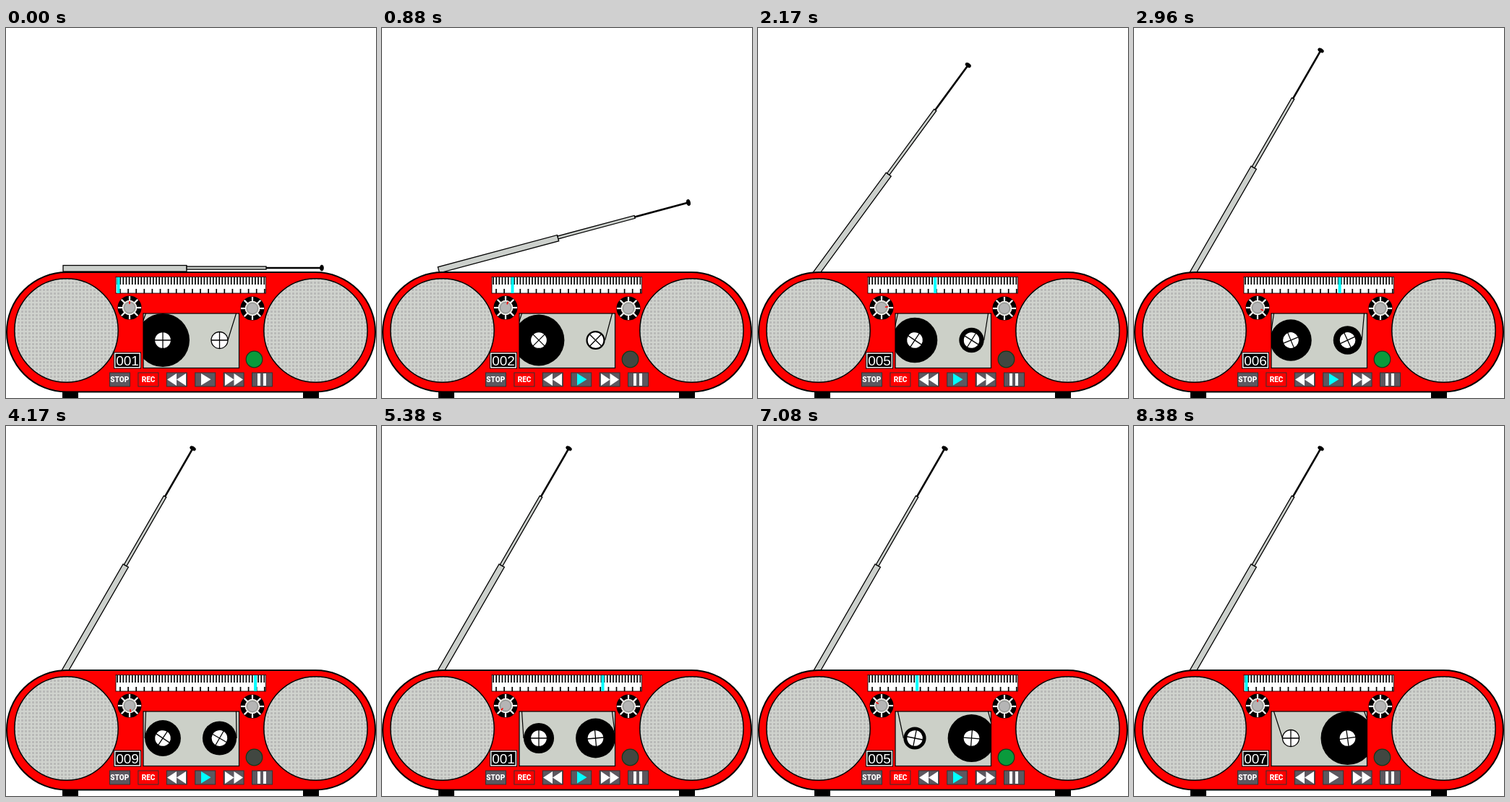
An HTML page that plays this animation: 512 px wide and 512 px high, repeating every 8430 ms.

```html
<!DOCTYPE html>
<html lang="en">
<head>
<meta charset="utf-8">
<title>Radio cassette player</title>
<style>
  html, body { margin: 0; width: 100%; height: 100%; overflow: hidden; background: #fff; }
  svg { display: block; width: 100vw; height: 100vh; }
  .label { font: 900 10px Roboto, sans-serif; fill: #fff; text-anchor: middle; }
  .digits { font: 19px "Liberation Sans", Arial, sans-serif; fill: #fff; text-anchor: middle; }
</style>
</head>
<body>
<svg viewBox="0 0 512 512">
  <defs>
    <pattern id="mesh" width="5" height="5" patternUnits="userSpaceOnUse">
      <rect width="5" height="5" fill="#d0d3ce"/>
      <rect x="1" y="1" width="3" height="3" fill="#b9bab8"/>
    </pattern>
    <clipPath id="window"><rect x="190" y="395" width="132.5" height="75.5"/></clipPath>
    <g id="hub" stroke="#000" stroke-width="1.3">
      <circle r="11.5" fill="#fff"/>
      <path d="M-11.5 0H11.5M0-11.5V11.5"/>
    </g>
    <g id="knob">
      <circle r="13.3" fill="none" stroke="#000" stroke-width="6.5"/>
      <g id="marks" stroke="#fff" stroke-width="2.2"></g>
      <circle r="9.8" fill="#ccd0c8" stroke="#fff"/>
      <circle r="7.5" fill="#b5b5b5" stroke="#777" stroke-width=".8"/>
    </g>
  </defs>

  <g id="antenna" stroke="#000">
    <rect x="79" y="328.5" width="171" height="8.5" fill="#ccd0cc" stroke-width="1.3"/>
    <rect x="250" y="330" width="110" height="4" fill="#ccd0cc" stroke-width="1.3"/>
    <path d="M360 332H436" stroke-width="2.6"/>
    <ellipse cx="437" cy="332" rx="2.3" ry="4" fill="#000"/>
  </g>

  <path d="M78 500h22v12h-22zM411 500h22v12h-22z"/>
  <rect x="1" y="338" width="510" height="165.5" rx="82.7" fill="#f00" stroke="#000" stroke-width="2"/>
  <g fill="url(#mesh)" stroke="#000" stroke-width="1.5">
    <circle cx="83.5" cy="418.5" r="71.7"/>
    <circle cx="428.5" cy="418.5" r="71.7"/>
  </g>

  <rect x="152" y="344.5" width="207.5" height="22.5" fill="#fff" stroke="#000" stroke-width=".8"/>
  <path id="scale" stroke="#000" stroke-width="1.7"/>
  <rect id="needle" y="345" width="4" height="22" fill="#0ff"/>

  <use href="#knob" x="171" y="387"/>
  <path id="pointer" d="M0-5V-9" stroke="#f00" stroke-width="1.6"/>
  <use href="#knob" x="341" y="388"/>

  <rect x="190" y="395" width="132.5" height="75.5" fill="#ccd0c8"/>
  <g clip-path="url(#window)">
    <path id="tape" fill="none" stroke="#000" stroke-width="1.2"/>
    <circle id="supply" cx="217" cy="432"/>
    <circle id="takeup" cx="295.5" cy="432"/>
    <use id="hubL" href="#hub"/>
    <use id="hubR" href="#hub"/>
  </g>
  <rect x="190" y="395" width="132.5" height="75.5" fill="none" stroke="#000" stroke-width="1.2"/>

  <rect x="149" y="448.5" width="38" height="23"/>
  <rect x="150.7" y="450.2" width="34.6" height="19.6" fill="none" stroke="#fff" stroke-width="1.4"/>
  <text id="count" class="digits" x="168" y="467"></text>
  <circle id="led" cx="343.5" cy="458.5" r="11.3" stroke="#123a1c" stroke-width="1.2"/>

  <g id="buttons" stroke="#333" stroke-width="1"></g>
  <text class="label" x="157.3" y="490">STOP</text>
  <text class="label" x="197" y="490">REC</text>
  <path fill="#fff" d="M236 478v17l-13-8.500zM249 478v17l-13-8.500zM303 478v17l12.500-8.500zM315.500 478v17l12.500-8.500zM348 478h4v17h-4zM356 478h4v17h-4z"/>
  <path id="play" d="M270 478v16.500l13.500-8.300z"/>
</svg>
<script>
const $ = id => document.getElementById(id);
const set = (id, attrs) => {
  for (const name in attrs) $(id).setAttribute(name, attrs[name]);
};

const LOOP = 8430, FPS = 24, LAST = 201;
const START = 0.375, PLAY = 8;

let ticks = "";
for (let x = 154; x < 359; x += 4.15) ticks += `M${x} 345V355`;
for (let x = 158; x < 359; x += 11.1) ticks += `M${x} 361V367`;
set("scale", { d: ticks });

for (let a = 0; a < 360; a += 45)
  $("marks").innerHTML += `<path d="M0-9V-16" transform="rotate(${a})"/>`;

for (let i = 0; i < 6; i++)
  $("buttons").innerHTML += `<rect x="${143.5 + i * 39.4}" y="477" width="28" height="19" fill="${i == 1 ? "#f00" : "#5c5860"}"/>`;

function draw(ms) {
  const frame = Math.min(LAST, Math.floor((ms % LOOP + 5) * FPS / 1000));
  const t = Math.min(PLAY, Math.max(0, frame / FPS - START));
  const playing = t > 0 && t < PLAY;

  // The antenna rises 30 degrees per second and stops at 60.
  set("antenna", { transform: `rotate(${-Math.min(60, t * 30)} 87 336)` });
  set("needle", { x: 153.5 + 50 * (4 - Math.abs(t - 4)) });
  set("pointer", { transform: `translate(171 387) rotate(${t * 45})` });

  const wound = 25.5 * t / PLAY;
  const left = 37 - wound, right = 11.5 + wound;
  set("supply", { r: left });
  set("takeup", { r: right });
  set("tape", { d: `M193.500 395L${217 - left} 432M318.500 395L${295.5 + right} 432` });
  set("hubL", { transform: `translate(217 432) rotate(${t * 270})` });
  set("hubR", { transform: `translate(295.5 432) rotate(${t * 269})` });

  $("count").textContent = String(Math.floor(frame / 12) % 10 + 1).padStart(3, "0");
  const beat = frame % 12;
  set("led", { fill: beat > 3 && beat < 10 ? "#414741" : "#0a9a3c" });
  set("play", { fill: playing ? "#0ff" : "#fff" });
}

const begin = performance.now();
function tick() {
  draw(performance.now() - begin);
  requestAnimationFrame(tick);
}
tick();
</script>
</body>
</html>
```
